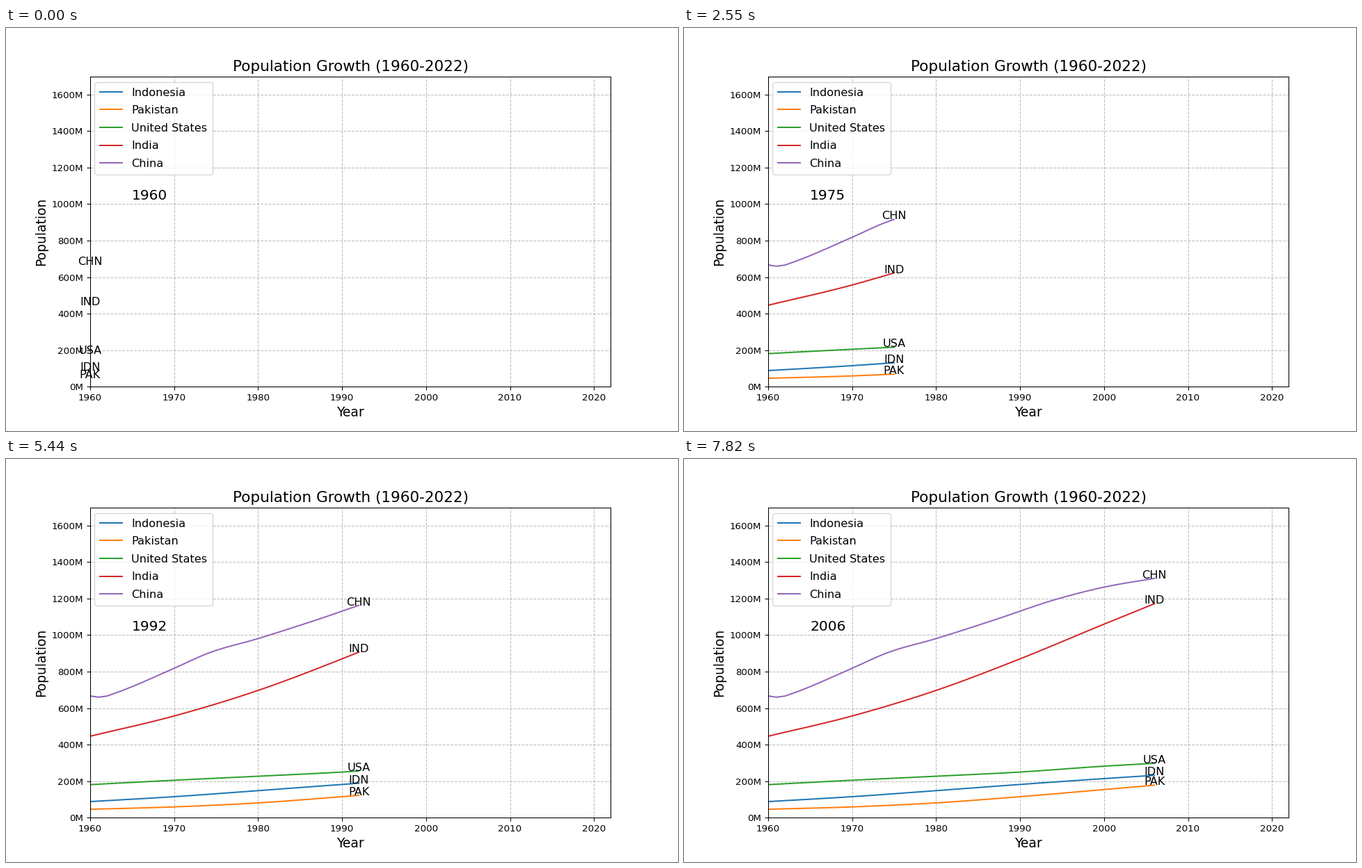
These frames come from a looping animation (966x580 px, 7.99 s). A matplotlib script:

```python
import numpy as np
import matplotlib.pyplot as plt
from matplotlib.animation import FuncAnimation

DPI = 96.6
START, END = 1960, 2006
years = np.arange(START, END + 1)
decades = [1960, 1970, 1980, 1990, 2000, 2006]


def smooth(xs, ys):
    """Cubic Hermite curve through key points, sampled every year."""
    xs, ys = np.array(xs, float), np.array(ys, float)
    slope = np.gradient(ys, xs)
    k = np.clip(np.searchsorted(xs, years, side="right") - 1, 0, len(xs) - 2)
    h = xs[k + 1] - xs[k]
    t = (years - xs[k]) / h
    ease = t * t * (3 - 2 * t)
    bend = t * (1 - t) * ((1 - t) * slope[k] - t * slope[k + 1])
    return ys[k] + (ys[k + 1] - ys[k]) * ease + h * bend


# Key populations in millions; China's early dip needs yearly points
china_years = [1960, 1961, 1962, 1963, 1970, 1974, 1980, 1987, 1994, 2000, 2006]
china = [667, 660, 666, 682, 818, 900, 981, 1084, 1192, 1263, 1311]

countries = [
    ("Indonesia", "IDN", smooth(decades, [88, 115, 148, 182, 214, 232])),
    ("Pakistan", "PAK", smooth(decades, [46, 59, 81, 115, 154, 178])),
    ("United States", "USA", smooth(decades, [181, 205, 227, 250, 282, 298])),
    ("India", "IND", smooth(decades, [446, 557, 697, 870, 1060, 1172])),
    ("China", "CHN", smooth(china_years, china)),
]

# The tiny margin keeps the pixel size from rounding down
fig, ax = plt.subplots(figsize=((966 + 1e-6) / DPI, (580 + 1e-6) / DPI), dpi=DPI)
ax.set_xlim(START, 2022)
ax.set_ylim(0, 1700)
ax.yaxis.set_major_formatter("{x:.0f}M")
ax.set_title("Population Growth (1960-2022)", fontsize=16)
ax.set_xlabel("Year", fontsize=14)
ax.set_ylabel("Population", fontsize=14)
ax.grid(True, linestyle="--", color="gray", alpha=0.5)

lines = [ax.plot([], [], label=name)[0] for name, _, _ in countries]
tags = [ax.text(START, 0, code, fontsize=12, ha="center")
        for _, code, _ in countries]
year_text = ax.text(1965, 1025, "", fontsize=15)
ax.legend(loc="upper left", fontsize=12, labelspacing=0.655, borderpad=0.49,
          bbox_to_anchor=(-0.002, 1))


def update(i):
    for line, tag, (_, _, pop) in zip(lines, tags, countries):
        line.set_data(years[:i + 1], pop[:i + 1])
        tag.set_position((years[i], pop[i]))
    year_text.set_text(str(years[i]))
    return [*lines, *tags, year_text]


anim = FuncAnimation(fig, update, frames=len(years), interval=170,
                     repeat=True, repeat_delay=0)
plt.show()
```
